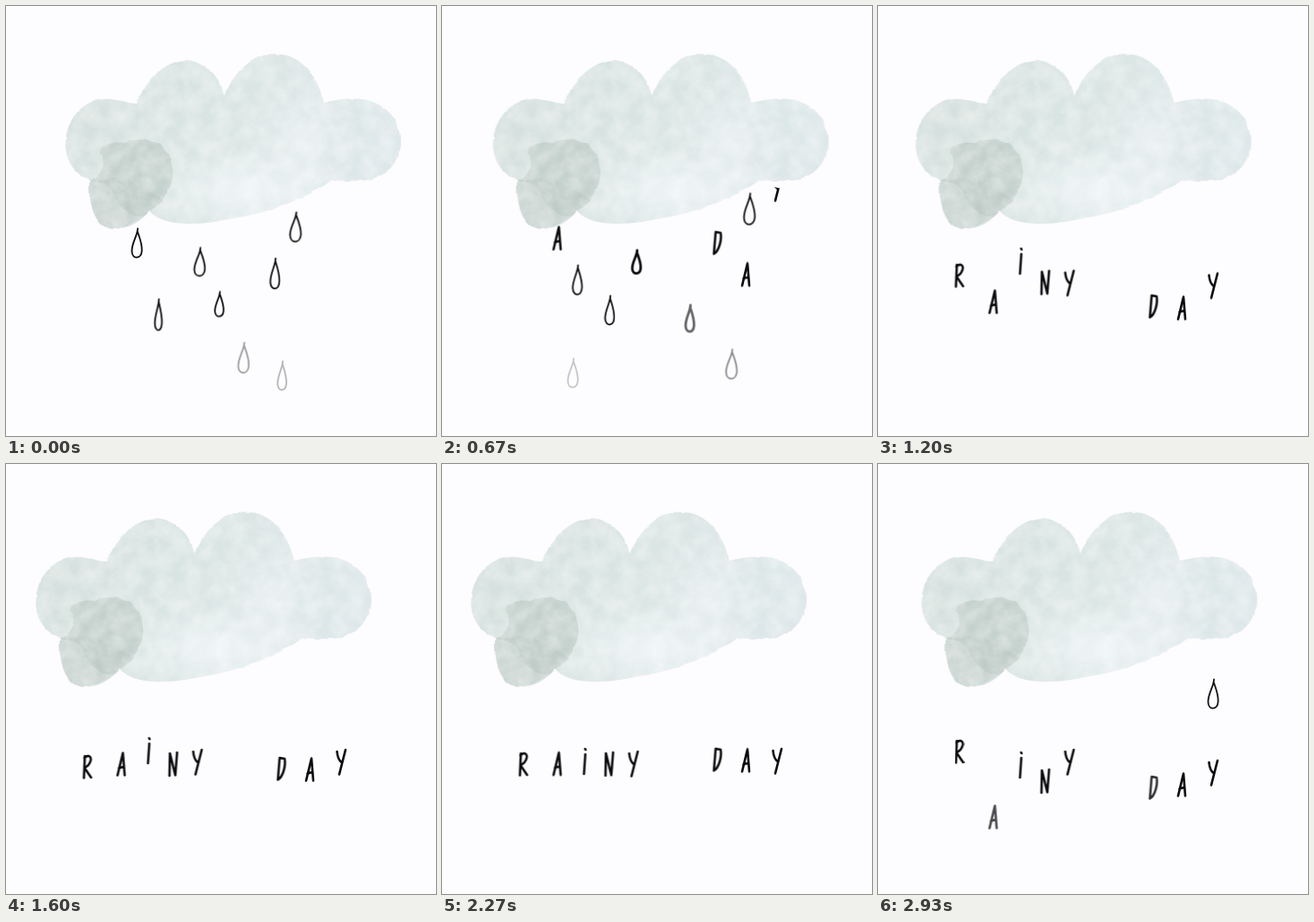
Animation of 480x480 px, one loop 2990 ms. Source, as an HTML page without scripts:

```html
<!DOCTYPE html>
<html lang="en">
<head>
<meta charset="utf-8">
<title>Rainy day</title>
<style>
html, body { margin: 0; width: 100%; height: 100%; overflow: hidden; background: #fdfcff; }
svg { display: block; width: 100vw; height: 100vh; }

/* 45 frames per loop */
:root { --loop: 2.99s; --frame: calc(var(--loop) / 45); }

.ink { fill: none; stroke: #0b0b0d; stroke-linecap: round; stroke-linejoin: round; }
.letters { stroke-width: 2.6; }
.drops { stroke-width: 1.8; }

.cloud { animation: drift var(--loop) infinite; }
@keyframes drift {
  0% { transform: translateX(0); animation-timing-function: cubic-bezier(.37, 0, .63, 1); }
  65.5% { transform: translateX(-36px); animation-timing-function: cubic-bezier(.47, 0, .745, .715); }
  100% { transform: translateX(-16.4px); }
}

/* --v, --u: pixels per frame; --f: frame where fading starts */
.drop {
  --u: 0;
  animation: fall var(--loop) steps(45) infinite,
    fade var(--loop) calc((var(--f) - 20) * var(--frame)) linear infinite;
}
.bold { stroke-width: 2.8; }
@keyframes fall {
  from { transform: translate(0, 0); }
  to { transform: translate(calc(var(--u) * 45px), calc(var(--v) * 45px)); }
}
@keyframes fade {
  0%, 44.44% { opacity: 1; }
  53.33%, 100% { opacity: 0; }
}
.early { animation: early var(--loop) step-end infinite; }
.mid { animation: mid var(--loop) step-end infinite; }
.late { animation: late var(--loop) step-end infinite; }
@keyframes early { 0% { opacity: 1; } 37.78%, 100% { opacity: 0; } }
@keyframes mid { 0% { opacity: 0; } 17.78% { opacity: 1; } 37.78%, 100% { opacity: 0; } }
@keyframes late { 0% { opacity: 0; } 82.22%, 100% { opacity: 1; } }

/* heights: --s start, --a falling, --b landing, --c low, --d rest, --e leaving */
.letter { --o: 1; animation: settle var(--loop) infinite; }
@keyframes settle {
  0% { transform: translate(var(--x), var(--s)); animation-timing-function: steps(10); }
  22.22% { transform: translate(var(--x), var(--a)); animation-timing-function: cubic-bezier(.33, .45, .67, .88); }
  40% { transform: translate(var(--x), var(--b)); animation-timing-function: cubic-bezier(.3, .5, .6, 1); }
  53.33% { transform: translate(var(--x), var(--c)); animation-timing-function: ease-in-out; }
  75.56% { transform: translate(var(--x), var(--d)); animation-timing-function: cubic-bezier(.6, -.25, .85, .6); }
  88.9% { opacity: 1; }
  97.78%, 100% { transform: translate(var(--x), var(--e)); opacity: var(--o); }
}
</style>
</head>
<body>
<svg viewBox="0 0 480 480" role="img" aria-label="Rainy day">
  <defs>
    <path id="drop" d="M1-16.500C1-9-6 0-5.500 9C-5 18 5 18 5.700 8C6 0 3-7 .5-14" vector-effect="non-scaling-stroke"/>
    <path id="R" d="M-2.500-12L-3.500 12.500M-3-10C1-14 5-12 4-7C3-3 0 0-3 1L4.500 12"/>
    <path id="A" d="M-4 12.500L2-12.500L4 12.500M-2.500 4.500L3 3"/>
    <path id="I" d="M.5-8L-1 14M.3-14L.8-13"/>
    <path id="N" d="M-4 13L-3.500-12L2.500 12.500L4.500-13"/>
    <path id="Y" d="M-4.500-12C-4-6-2-2 .5 0M5-14L-2 13.500"/>
    <path id="D" d="M-2-12L-4 12.500C2 9 5-4 3.500-11L-2-12"/>

    <filter id="wash" x="-5%" y="-5%" width="110%" height="110%" color-interpolation-filters="sRGB">
      <feTurbulence type="fractalNoise" baseFrequency=".09" numOctaves="2" seed="4" result="rough"/>
      <feDisplacementMap in="SourceGraphic" in2="rough" scale="3" xChannelSelector="R" yChannelSelector="G" result="shape"/>
      <feTurbulence type="fractalNoise" baseFrequency=".06" numOctaves="5" seed="9"/>
      <feColorMatrix values="0 0 0 0 1  0 0 0 0 1  0 0 0 0 1  .65 0 0 0 -.15"/>
      <feComposite in2="shape" operator="in" result="light"/>
      <feMerge><feMergeNode in="shape"/><feMergeNode in="light"/></feMerge>
    </filter>
    <linearGradient id="tone" x2="1" y2=".25">
      <stop stop-color="#d4dfdc"/>
      <stop offset=".5" stop-color="#d9e5e3"/>
      <stop offset="1" stop-color="#dfe8ea"/>
    </linearGradient>
    <radialGradient id="glow">
      <stop stop-color="#f2f8fa" stop-opacity=".8"/>
      <stop offset="1" stop-color="#f2f8fa" stop-opacity="0"/>
    </radialGradient>
    <clipPath id="edge"><use href="#body"/></clipPath>
  </defs>

  <rect width="480" height="480" fill="#fdfcff"/>

  <g class="ink drops">
    <g class="early">
      <g class="drop" style="--v:14.5;--f:7"><use href="#drop" transform="translate(146 265)"/></g>
      <g class="drop" style="--v:15;--f:2"><use href="#drop" transform="translate(170 345) scale(.7 1.08)"/></g>
      <g class="drop" style="--v:16.7;--f:4"><use href="#drop" transform="translate(216 286) scale(1.05 .98)"/></g>
      <g class="drop" style="--v:8.4;--f:6"><use href="#drop" transform="translate(238 333) scale(.86)"/></g>
      <g class="drop" style="--v:15;--f:-2.4"><use href="#drop" transform="translate(265 393) scale(1.05)"/></g>
      <g class="drop" style="--v:15;--f:-2.8"><use href="#drop" transform="translate(308 413) scale(.87 1)"/></g>
      <g class="drop" style="--v:16.5;--f:2"><use href="#drop" transform="translate(300 299) scale(.9 1.05)"/></g>
      <g class="drop" style="--v:15.3;--f:8"><use href="#drop" transform="translate(323 247) scale(1.08 1.02)"/></g>
      <g class="drop" style="--v:15;--f:11.5"><use href="#drop" transform="translate(151 156) scale(.92 1.02)"/></g>
      <g class="drop" style="--v:16.3;--u:-1.6;--f:11"><use href="#drop" transform="translate(203 177) scale(.9 1)"/></g>
      <g class="drop bold" style="--v:16;--f:8.6"><use href="#drop" transform="translate(276.500 189) scale(.84 .92)"/></g>
    </g>
    <g class="mid">
      <g class="drop bold" style="--v:24;--f:11.5"><use href="#drop" transform="translate(217 46) scale(.84 .8)"/></g>
      <g class="drop" style="--v:34;--f:11.5"><use href="#drop" transform="translate(343 -113) scale(1.08)"/></g>
    </g>
    <g class="late">
      <g class="drop" style="--v:15;--f:44"><use href="#drop" transform="translate(374 -403)"/></g>
    </g>
  </g>

  <g class="ink letters">
    <g class="letter" style="--x:90.500px;--s:140px;--a:200px;--b:300px;--c:338px;--d:335px;--e:321px"><use href="#R"/></g>
    <g class="letter" style="--x:128.500px;--s:140px;--a:258px;--b:330px;--c:335px;--d:335px;--e:394px;--o:.75"><use href="#A"/></g>
    <g class="letter" style="--x:159.500px;--s:140px;--a:180px;--b:284px;--c:320px;--d:332px;--e:336px"><use href="#I"/></g>
    <g class="letter" style="--x:186.500px;--s:140px;--a:195px;--b:308px;--c:335px;--d:335px;--e:354px"><use href="#N"/></g>
    <g class="letter" style="--x:213.500px;--s:140px;--a:195px;--b:309px;--c:333px;--d:335px;--e:333px"><use href="#Y"/></g>
    <g class="letter" style="--x:307.500px;--s:118px;--a:263px;--b:335px;--c:340px;--d:330px;--e:361px;--o:.85"><use href="#D"/></g>
    <g class="letter" style="--x:339px;--s:154px;--a:299px;--b:337px;--c:341px;--d:331px;--e:358px"><use href="#A"/></g>
    <g class="letter" style="--x:374px;--s:140px;--a:202px;--b:312px;--c:333px;--d:332px;--e:345px"><use href="#Y"/></g>
  </g>

  <g class="cloud">
    <circle cx="394" cy="153" r="51" fill="#fdfcff"/>
    <g filter="url(#wash)">
      <path id="body" fill="url(#tone)" d="M93 194C73 186 64 167 67 147C70 120 94 98 123 105C133 106 139 109 145 109C156 85 176 60 203 60.500C225 64 239 79 243.500 100C253 76 275 52 302 53.500C330 54 349 80 354.500 108C370 104 386 102 400 104.500C426 110 440 128 440 150C440 176 424 193 396 195C382 196 370 193 360 197C348 206 330 214 318 218C290 232 250 238 225 242C205 244 188 243 176 239C170 237 164 233 160 229C150 241 138 248 122 249C100 249 92 225 93 194Z"/>
      <g clip-path="url(#edge)">
        <ellipse cx="270" cy="205" rx="110" ry="48" fill="url(#glow)"/>
        <ellipse cx="335" cy="150" rx="55" ry="55" fill="url(#glow)" opacity=".6"/>
        <circle cx="398" cy="149" r="46" fill="#d8e3e4" opacity=".3"/>
        <path fill="#c3cec9" opacity=".65" d="M93 195C104 190 118 194 128 190L176 216C166 226 154 240 122 250C98 250 90 225 93 195Z"/>
        <path fill="#b9c6c0" opacity=".65" d="M106 165C104 155 120 150 132 153C146 146 160 149 170 154C184 164 189 182 185 196C180 214 166 226 152 235C138 236 124 224 118 206C112 198 104 196 94 195C108 188 112 176 106 165Z"/>
        <path fill="none" stroke="#aebbb5" stroke-opacity=".6" d="M93 194Q105 198 117 195"/>
      </g>
    </g>
  </g>
</svg>
</body>
</html>
```
